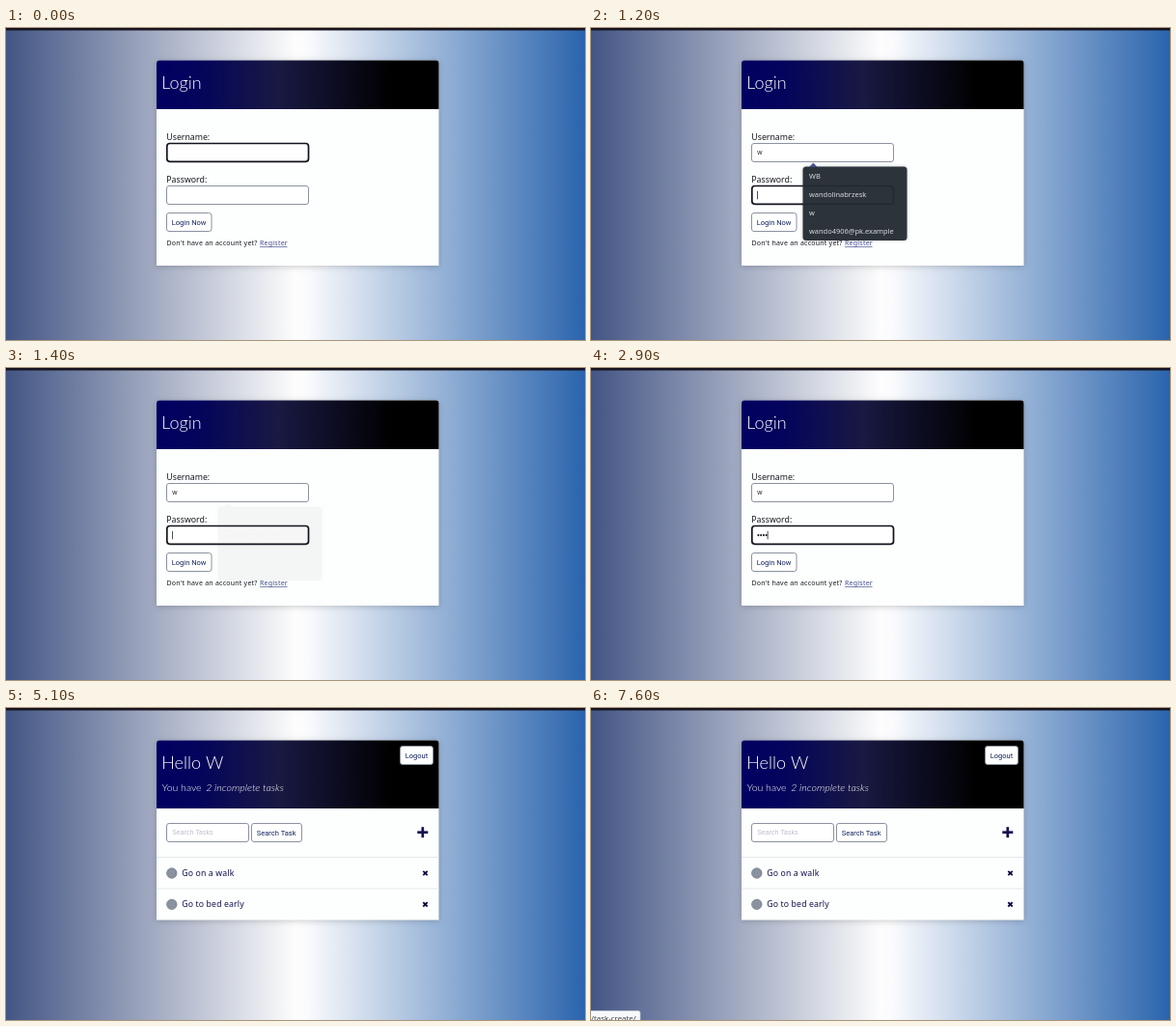
An HTML page with a canvas that plays this animation: 600x323 px, repeating every 8000 ms.

```html
<!DOCTYPE html>
<html lang="en">
<head>
<meta charset="utf-8">
<title>Task list login</title>
<style>
html, body { margin: 0; width: 100%; height: 100%; overflow: hidden; }
canvas { display: block; width: 600px; height: 323px; }
</style>
</head>
<body>
<canvas id="stage"></canvas>
<script>
const W = 600, H = 323, LOOP = 8000;
const canvas = document.getElementById('stage');
const ctx = canvas.getContext('2d');
const dpr = window.devicePixelRatio || 1;
canvas.width = W * dpr;
canvas.height = H * dpr;

const NOTO = '"Noto Sans", sans-serif';
const ROBOTO = 'Roboto, sans-serif';
const LATO = 'Lato, sans-serif';
const ARIAL = '"Liberation Sans", sans-serif';
const NAVY = '#11124e', EDGE = '#8b92a0';

const SUGGESTIONS = ['WB', 'wandolinabrzesk', 'w', 'wando4906@pk.example'];
const KEY_TIMES = [2300, 2600, 2700, 2900, 3000];
const POPUP_FADE = [0.94, 0.4, 0.03, 0];
const STATUS_FADE = [0.35, 0.5, 0.65, 0.8, 0.92, 1];

function text(str, x, y, font, color, spacing = 0) {
  ctx.font = font;
  ctx.fillStyle = color;
  ctx.letterSpacing = spacing + 'px';
  ctx.fillText(str, x, y);
}

function box(x, y, w, h, r, fill, stroke, line = 1) {
  ctx.beginPath();
  ctx.roundRect(x, y, w, h, r);
  if (fill) { ctx.fillStyle = fill; ctx.fill(); }
  if (stroke) { ctx.strokeStyle = stroke; ctx.lineWidth = line; ctx.stroke(); }
}

function gradient(x0, x1, stops) {
  const g = ctx.createLinearGradient(x0, 0, x1, 0);
  for (const [at, color] of stops) g.addColorStop(at, color);
  return g;
}

function segment(x0, y0, x1, y1, color, width) {
  ctx.beginPath();
  ctx.moveTo(x0, y0);
  ctx.lineTo(x1, y1);
  ctx.strokeStyle = color;
  ctx.lineWidth = width;
  ctx.stroke();
}

// Value of a stepped fade, one step every 100 ms
function stepped(list, start, t) {
  const i = Math.floor((t - start) / 100);
  return list[Math.min(i, list.length - 1)];
}

function backdrop() {
  ctx.fillStyle = gradient(0, W, [[0, '#435584'], [0.5, '#fdfdfd'], [0.52, '#fafbfd'], [1, '#2a64ad']]);
  ctx.fillRect(0, 0, W, H);
  ctx.fillStyle = '#17141f';
  ctx.fillRect(0, 0, W, 2.5);
}

function card(headBottom, bottom) {
  ctx.save();
  ctx.shadowColor = 'rgba(0,0,0,0.2)';
  ctx.shadowBlur = 6 * dpr;
  ctx.shadowOffsetY = dpr;
  box(156, 33.5, 292.5, bottom - 33.5, [3, 3, 0, 0], '#fdfefe');
  ctx.restore();
  const fill = gradient(156, 448, [[0, '#020061'], [0.15, '#04045c'], [0.43, '#191943'], [0.84, '#000'], [1, '#000']]);
  box(156, 33.5, 292.5, headBottom - 33.5, [3, 3, 0, 0], fill);
}

function field(x, y, w, focused) {
  if (focused) box(x + 0.8, y + 0.5, w - 1.3, 18.8, 3, '#fff', '#12131c', 1.7);
  else box(x + 0.5, y + 0.5, w - 1, 19, 2.5, '#fff', EDGE);
}

function button(label, x, y, w) {
  box(x + 0.5, y + 0.5, w - 1, 19, 2.5, '#fff', EDGE);
  text(label, x + 5.8, y + 12.8, '7.5px ' + ROBOTO, '#10215c');
}

function caret(x, y) {
  ctx.fillStyle = '#222';
  ctx.fillRect(x, y, 0.8, 8.5);
}

function popup(alpha) {
  if (alpha <= 0) return;
  ctx.save();
  ctx.globalAlpha = alpha;
  ctx.save();
  ctx.shadowColor = 'rgba(0,0,0,0.25)';
  ctx.shadowBlur = 3 * dpr;
  box(219.5, 143.5, 108, 76.5, 3.5, '#242b32');
  ctx.restore();
  ctx.beginPath();
  ctx.moveTo(226, 144);
  ctx.lineTo(230.3, 139.5);
  ctx.lineTo(234.6, 144);
  ctx.fill();
  SUGGESTIONS.forEach((s, i) => text(s, 226, 155.8 + i * 19, '7.45px ' + NOTO, '#e3e6e8'));
  ctx.restore();
}

function login(t) {
  const focus = t < 1200 ? 'user' : t < 4200 ? 'pass' : '';
  const typed = KEY_TIMES.filter(k => t >= k).length;
  card(84, 246);
  text('Login', 161.3, 63, '300 18px ' + LATO, '#fff');

  text('Username:', 166.3, 116.3, '8.75px ' + NOTO, '#17181f');
  field(166, 119, 148, focus === 'user');
  if (t >= 600) text('w', 172.2, 131.3, '7.2px ' + ARIAL, '#222');

  text('Password:', 166.3, 160.3, '8.75px ' + NOTO, '#17181f');
  field(166, 163, 148, focus === 'pass');
  ctx.fillStyle = '#15161c';
  for (let i = 0; i < typed; i++) {
    ctx.beginPath();
    ctx.arc(173.4 + i * 2.75, 173.1, 1.05, 0, 7);
    ctx.fill();
  }

  if (t >= 300 && t < 600) caret(172.1, 124.5);
  else if (t >= 600 && t < 1200) caret(177.6, 124.5);
  else if (focus === 'pass' && (t < 1800 || (t >= 2300 && t < 3600))) caret(172.1 + typed * 2.65, 168.8);

  button('Login Now', 166, 191, 47.5);
  text("Don't have an account yet?", 166.5, 225.3, '7px ' + NOTO, '#17181f', 0.23);
  text('Register', 263, 225.3, '7px ' + NOTO, '#414b8c', 0.23);
  segment(263, 226.6, 291.5, 226.6, '#414b8c', 0.7);

  if (t >= 600) popup(t < 1200 ? 1 : stepped(POPUP_FADE, 1200, t));
}

function task(label, y) {
  ctx.beginPath();
  ctx.arc(171.8, y, 5.4, 0, 7);
  ctx.fillStyle = '#a4abb5';
  ctx.fill();
  for (const r of [1, 2.5, 4, 5.2]) {
    ctx.beginPath();
    ctx.arc(171.8, y, r, 0, 7);
    ctx.strokeStyle = '#667080';
    ctx.lineWidth = 0.65;
    ctx.stroke();
  }
  text(label, 182.2, y + 3, '500 8.7px ' + NOTO, NAVY, 0.15);
  segment(432.3, y - 2.2, 436.7, y + 2.2, '#07073f', 1.8);
  segment(436.7, y - 2.2, 432.3, y + 2.2, '#07073f', 1.8);
}

function status(alpha) {
  ctx.save();
  ctx.globalAlpha = alpha;
  box(-2, 313.5, 53, 12, [0, 2, 0, 0], '#f7f8f9', '#c3c7ce', 0.6);
  text('/task-create/', 0, 323.6, '7.9px ' + NOTO, '#3c4048');
  ctx.restore();
}

function tasks(t) {
  card(104, 219.5);
  text('Hello W', 161.3, 63, '300 18px ' + LATO, '#fff');
  text('You have', 161.5, 86.3, '300 10.5px ' + LATO, '#fff');
  text('2 incomplete tasks', 207.3, 86.3, 'italic 300 10.6px ' + LATO, '#fff');
  button('Logout', 408, 39, 35);

  field(166, 119, 86, false);
  text('Search Tasks', 172.2, 131.4, '6.8px ' + ARIAL, '#b8bccb', 0.12);
  button('Search Task', 254, 119, 53);
  segment(426.3, 128.7, 437.3, 128.7, NAVY, 2.7);
  segment(431.8, 123.2, 431.8, 134.2, NAVY, 2.7);

  for (const y of [154.5, 187]) segment(156, y, 448.5, y, '#e2e4e9', 0.9);
  task('Go on a walk', 171);
  task('Go to bed early', 203.3);
  if (t >= 7100) status(stepped(STATUS_FADE, 7100, t));
}

function draw(now) {
  const t = (now - start) % LOOP;
  ctx.setTransform(dpr, 0, 0, dpr, 0, 0);
  backdrop();
  if (t < 5100) login(t);
  else tasks(t);
  requestAnimationFrame(draw);
}

let start = performance.now();
requestAnimationFrame(now => { start = now; draw(now); });
</script>
</body>
</html>
```
